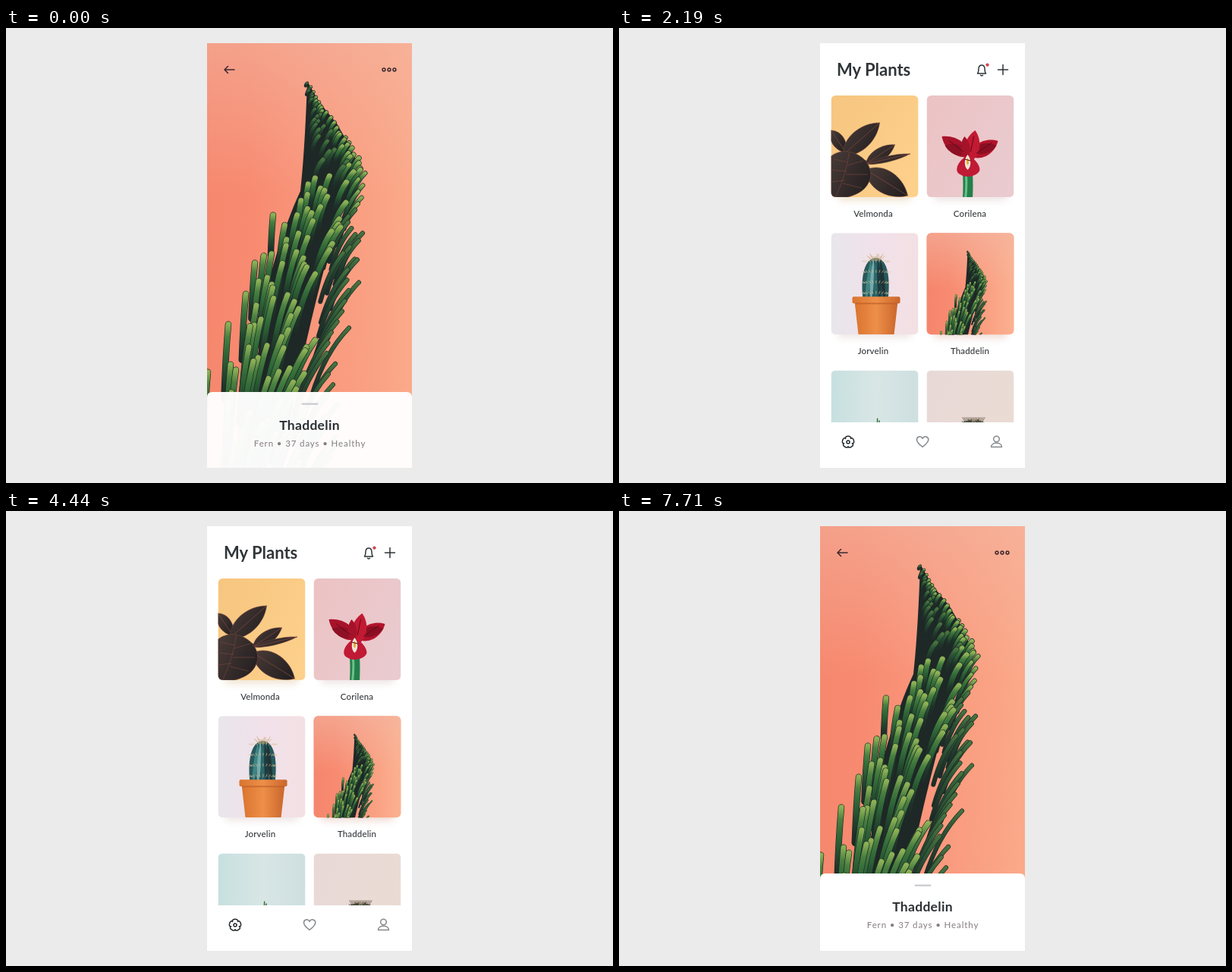
Write an HTML page that moves like this. It is 800x600 px and loops after 7740 ms.

```html
<!DOCTYPE html>
<html lang="en">
<head>
<meta charset="utf-8">
<title>My Plants</title>
<style>
  html, body { margin: 0; width: 100%; height: 100%; overflow: hidden; background: #ebebeb; }
  svg { display: block; width: 800px; height: 600px; font-family: Lato, "Open Sans", sans-serif; }
  .title { font-weight: 700; font-size: 22px; fill: #2f3538; }
  .label { font-size: 11.5px; font-weight: 500; letter-spacing: .15px; fill: #34383b; text-anchor: middle; }
  .name { font-size: 17.5px; font-weight: 700; letter-spacing: .3px; fill: #2b3033; text-anchor: middle; }
  .info { font-size: 11.5px; letter-spacing: .88px; fill: #857d80; text-anchor: middle; }
  .line { fill: none; stroke-width: 1.5; stroke-linecap: round; stroke-linejoin: round; }
</style>
</head>
<body>
<svg id="stage" viewBox="0 0 800 600"></svg>
<script>
const LOOP = 7740;
const stage = document.getElementById('stage');

// ---- helpers ----
let seed = 11;
const random = () => (seed = (seed * 16807) % 2147483647) / 2147483647;
const between = (a, b) => a + (b - a) * random();
const lerp = (a, b, u) => a + (b - a) * u;
const clamp = v => Math.max(0, Math.min(1, v));
const span = (t, start, length) => clamp((t - start) / length);
const inOut = p => p < .5 ? 2 * p * p : 1 - 2 * (1 - p) ** 2;
const out = (p, n) => 1 - (1 - p) ** n;
const fix = v => v.toFixed(1);
const repeat = (n, f) => Array.from({ length: n }, (_, i) => f(i)).join('');
const rect = (x, y, w, h, fill, more = '') =>
  `<rect x="${x}" y="${y}" width="${w}" height="${h}" fill="${fill}" ${more}/>`;
const stroke = (d, color, width, more = '') =>
  `<path d="${d}" fill="none" stroke="${color}" stroke-width="${width}" stroke-linecap="round" ${more}/>`;
const gradient = (id, direction, ...colors) =>
  `<linearGradient id="${id}" ${direction}>${colors.map((c, i) =>
    `<stop offset="${i / (colors.length - 1)}" stop-color="${c}"/>`).join('')}</linearGradient>`;
const across = 'x1="0" y1="0" x2="1" y2="0"';
const down = 'x1="0" y1="0" x2="0" y2="1"';
const diagonal = 'x1="0" y1=".2" x2="1" y2=".8"';

function leaf(x1, y1, x2, y2, w, fill, vein) {
  const dx = x2 - x1, dy = y2 - y1, len = Math.hypot(dx, dy);
  const nx = -dy / len * w, ny = dx / len * w;
  const at = (u, s) => `${fix(x1 + dx * u + nx * s)} ${fix(y1 + dy * u + ny * s)}`;
  return `<path d="M${x1} ${y1}C${at(.2, 1)} ${at(.7, 1)} ${x2} ${y2}C${at(.7, -1)} ${at(.2, -1)} ${x1} ${y1}Z" fill="${fill}"
    ${vein ? `stroke="${vein}" stroke-width=".5"` : ''}/>` +
    (vein ? stroke(`M${x1} ${y1}L${x2} ${y2}`, vein, .9) : '');
}

// ---- fern, drawn at full-screen size ----
const outline = [ // y, left edge, right edge
  [70, 396, 399], [95, 395, 414], [125, 393, 437], [150, 392, 455], [180, 390, 474],
  [200, 388, 479], [225, 378, 468], [245, 350, 465], [268, 346, 471], [310, 324, 462],
  [350, 314, 460], [390, 304, 450], [440, 294, 436], [500, 286, 436], [600, 284, 432]];
const leadTips = [
  [397, 71], [352, 243], [350, 294], [328, 306], [316, 347], [333, 330], [293, 387], [327, 388],
  [296, 440], [303, 447], [320, 417], [266, 450], [366, 418], [344, 415], [380, 357], [393, 308],
  [438, 255], [465, 333], [452, 393], [463, 303], [470, 268], [437, 495], [323, 503], [338, 518], [372, 525], [393, 452]];

function edgesAt(y) {
  const i = Math.max(1, outline.findIndex(row => row[0] >= y));
  const a = outline[i - 1], b = outline[i], u = clamp((y - a[0]) / (b[0] - a[0]));
  return [lerp(a[1], b[1], u), lerp(a[2], b[2], u)];
}

function needle(x, y) {
  const [left, right] = edgesAt(y);
  const u = clamp((x - left) / Math.max(1, right - left));
  const top = y < 185, edge = u > .8;
  const len = top ? 5 + (y - 70) * .22 : Math.min(95, 34 + (y - 185) * .3);
  const lean = top ? .6 : .08 + u * .66;
  const cx = x - Math.sin(lean) * len * .5, cy = y + Math.cos(lean) * len * .5;
  const bx = cx - Math.sin(lean * .5) * len * .5, by = cy + len * .6;
  const w = top ? 3.2 + (y - 70) * .03 : edge ? 5 : 7.4;
  const d = `M${fix(x)} ${fix(y + w / 2)}Q${fix(cx)} ${fix(cy)} ${fix(bx)} ${fix(by)}`;
  const dull = top ? u < .75 : edge && y > 230;
  return stroke(d, '#1d2a26', w + 1) + stroke(d, dull ? 'url(#shade)' : 'url(#needle)', w - .4);
}

function fern() {
  const tips = leadTips.slice();
  let side = 0;
  for (let y = 76; y < 600; y += y < 185 ? 2.2 : y < 300 ? 2.7 : 4.6) {
    const [left, right] = edgesAt(y);
    const inner = y < 185 ? between(.35, .95) : between(.04, .8);
    tips.push([lerp(left, right, side++ % 3 ? inner : between(.84, 1)), y]);
  }
  tips.sort((a, b) => a[1] - b[1]);
  return rect(230, 0, 360, 600, 'url(#coral)') + rect(230, 0, 360, 220, 'url(#haze)') +
    `<path d="M397 70C395 130 392 180 388 215C374 245 358 290 346 335C338 385 336 440 312 500L298 600H362
      C372 520 392 420 424 300C438 255 450 215 468 188L452 154L436 126L413 98Z" fill="#1e2826"/>` +
    tips.map(tip => needle(...tip)).join('');
}

// ---- card pictures, 115 by 134 ----
const dark = 'url(#wine)', vein = '#74433c';
const rubber = () => rect(0, 0, 115, 134, 'url(#amber)') +
  stroke('M18 74Q40 86 56 90M40 96L60 112', '#3b2a28', 2) +
  leaf(0, 46, 20, 76, 11, dark, vein) + leaf(16, 78, 64, 36, 17, dark, vein) +
  leaf(46, 90, 84, 65, 11, dark, vein) + leaf(48, 90, 104, 77, 5, dark, vein) +
  leaf(46, 98, 101, 132, 20, dark, vein) +
  `<path d="M24 74C42 78 54 92 52 108C48 124 36 130 22 134H0V80C8 74 16 73 24 74Z" fill="${dark}" stroke="${vein}" stroke-width=".6"/>` +
  stroke('M24 75Q20 104 6 134M22 88L4 84M20 100L0 98M17 112L0 114M22 92L42 86M20 104L48 104M16 116L40 122', vein, .7);

const iris = () => rect(0, 0, 115, 134, 'url(#rose)') +
  stroke('M54 102Q55 118 54 136', '#22804a', 13, 'stroke-linecap="butt"') +
  stroke('M52 106Q53 120 51 136', '#6cc088', 3) +
  leaf(56, 80, 20, 54, 13, '#a8132a') + leaf(54, 76, 24, 66, 9, '#8e1024') +
  leaf(58, 80, 94, 60, 13, '#b3142b') + leaf(60, 74, 92, 66, 9, '#8b0f22') +
  leaf(56, 88, 64, 46, 13, '#c21a33') + leaf(52, 84, 50, 54, 8, '#a5132a') +
  `<path d="M52 80C40 88 36 100 44 104C52 110 68 106 70 98C70 90 62 84 58 80Z" fill="#c01a35"/>` +
  leaf(54, 98, 54, 78, 5, '#f3e6d8') + leaf(54, 92, 54, 82, 2, '#e0ad2d') +
  stroke('M50 84L58 86M30 60L48 74M86 62L66 76M62 54L58 74', '#5f0918', 1);

const cactus = () => rect(0, 0, 115, 134, 'url(#lilac)') +
  `<path d="M42 88C39 62 42 34 59 33C76 34 78 62 75 88Z" fill="#28595c"/>` +
  repeat(5, i => leaf(46 + i * 6.2, 90, 53 + i * 3, 34, 3.4, ['#3f8584', '#75aaa9', '#2c676b', '#1e3b40', '#203334'][i])) +
  repeat(44, i => {
    const a = -.2 - (i % 11) * .27, y = 38 + Math.floor(i / 11) * 14, x = 59 + Math.cos(a) * 15;
    return stroke(`M${fix(x)} ${y}l${fix(Math.cos(a) * 4)} ${fix(Math.sin(a) * 3)}`, '#d9c39b', .7);
  }) +
  repeat(13, i => stroke(`M${53 + i} 36l${fix((i - 6) * .9)} ${fix(between(-9, -4))}`, '#c9a978', .7)) +
  `<path d="M31 90H88L83 134H36Z" fill="url(#clay)"/>` + rect(28, 84, 63, 9, 'url(#clay)', 'rx="2"') +
  rect(32, 92, 55, 2, '#b75a24', 'opacity=".6"');

const grass = () => rect(0, 0, 115, 134, 'url(#mint)') +
  `<path d="M30 114H88L84 134H34Z" fill="#f3f5f3"/>` +
  repeat(65, i => {
    const x = between(20, 101), base = lerp(59, x, .55), y = 63 + Math.abs(x - 60) * .55 + between(0, 22);
    return stroke(`M${fix(base)} 117Q${fix(base)} 92 ${fix(x)} ${fix(y)}`, ['#4f8a35', '#79ac45', '#2f6530', '#9dc464'][i % 4], 1.4);
  });

const barrel = () => rect(0, 0, 115, 134, 'url(#blush)') +
  `<path d="M36 110H88L84 134H40Z" fill="#f4ece9"/><ellipse cx="62" cy="91" rx="28" ry="26" fill="#4a5842"/>` +
  repeat(100, () => {
    const a = between(0, 6.28), r = Math.sqrt(random()), x = 62 + Math.cos(a) * 28 * r, y = 91 + Math.sin(a) * 26 * r;
    return stroke(`M${fix(x - 2)} ${fix(y - 2)}l4 3m0 -3l-4 3`, random() < .6 ? '#d8c8ae' : '#2c352b', .8);
  }) +
  repeat(15, i => stroke(`M${50 + i * 1.7} 67l${fix((i - 7) * .4)} -5`, '#6c5a4a', .8));

const miniFern = () => '<use href="#fern" transform="scale(.335) translate(-236 -1)"/>';

const plants = [
  ['Velmonda', rubber, '#d9b98a'], ['Corilena', iris, '#d5bcbf'], ['Jorvelin', cactus, '#d6c4c0'],
  ['Thaddelin', miniFern, '#d9a898'], ['Marisolda', grass, '#b3c6c4'], ['Perenelda', barrel, '#cbbab5']];

const card = ([name, picture, tone], i) => `<g id="card${i}">
  <rect x="8" y="18" width="99" height="121" rx="8" fill="${tone}" opacity=".38" filter="url(#soft)"/>
  <g clip-path="url(#frame)">${picture()}</g>
  <text class="label" x="${i % 2 ? 57 : 55.5}" y="159.5">${name}</text></g>`;

// ---- icons ----
const flower = () => `<path d="${repeat(5, i => {
  const p = (k, r) => { const a = (i + k) * Math.PI * .4 - Math.PI * .3; return `${fix(Math.cos(a) * r)} ${fix(Math.sin(a) * r)}`; };
  return `${i ? '' : 'M' + p(-1, 5.7)}C${p(-.95, 10.3)} ${p(-.05, 10.3)} ${p(0, 5.7)}`;
})}Z"/><circle r="2"/>`;

stage.innerHTML = `<defs>
  ${gradient('coral', across, '#f5866d', '#f78a70', '#f9977c', '#faa485', '#fbb392')}
  <linearGradient id="haze" ${down}><stop stop-color="#f3b9a6" stop-opacity=".55"/><stop offset="1" stop-color="#f3b9a6" stop-opacity="0"/></linearGradient>
  ${gradient('needle', down, '#8bb055', '#4a8040', '#336c39', '#295a33', '#23442d', '#1f322a', '#1e2b27')}
  ${gradient('shade', down, '#47733f', '#2d5636', '#25432f', '#20342b', '#1e2b27')}
  ${gradient('amber', diagonal, '#f7c680', '#fdd08b')} ${gradient('rose', diagonal, '#ecc3c4', '#e9cbd0')}
  ${gradient('lilac', across, '#e8e6eb', '#f1e1ea', '#f3e0e4')} ${gradient('mint', across, '#c6e0df', '#d8e6e5', '#cedfe0')}
  ${gradient('blush', diagonal, '#e8d9d7', '#eadcd3')} ${gradient('wine', diagonal, '#463936', '#231f20')}
  ${gradient('clay', across, '#d9742f', '#ee8f49', '#c9662b')}
  <filter id="soft" x="-30%" y="-30%" width="160%" height="160%"><feGaussianBlur stdDeviation="5"/></filter>
  <filter id="drop" x="-50%" y="-50%" width="200%" height="200%"><feDropShadow dx="1" dy="1.5" stdDeviation="1.3" flood-opacity=".4"/></filter>
  <clipPath id="frame"><rect width="115" height="134" rx="6"/></clipPath>
  <clipPath id="phone"><rect x="265" y="20" width="270" height="560"/></clipPath>
  <clipPath id="list"><rect x="265" y="74" width="270" height="506"/></clipPath>
  <clipPath id="wipe"><rect id="wipeBox" x="265" y="20" width="270" height="560"/></clipPath>
  <g id="fern">${fern()}</g>
</defs>
${rect(0, 0, 800, 600, '#ebebeb')}
${rect(265, 20, 270, 560, '#fff')}
<g clip-path="url(#phone)">
  <g id="home">
    <g clip-path="url(#list)">${plants.map(card).join('')}</g>
    <g id="header">
      <text class="title" x="287" y="62.5">My Plants</text>
      <g class="line" stroke="#2e3437">
        <path d="M472.5 60H483.5C481.8 58 482.3 56 482 53.5C481.6 47.5 474.4 47.5 474 53.5C473.7 56 474.2 58 472.5 60ZM476.5 62.3Q478 63.6 479.5 62.3M499.5 55H512.5M506 48.5V61.5"/>
      </g>
      <circle cx="485.5" cy="48.6" r="2.2" fill="#d24552"/>
    </g>
    <g id="nav">
      <rect id="navBack" x="265" width="270" height="62" fill="#fff"/>
      <g class="line" stroke="#23282b" transform="translate(302 26)">${flower()}</g>
      <g class="line" stroke="#85898c">
        <path d="M400 32.5C394 28 392.5 25.5 392.5 22.8C392.5 18.5 398 17.2 400 21.3C402 17.2 407.8 18.5 407.8 22.8C407.8 25.5 406 28 400 32.5Z"/>
        <circle cx="497.5" cy="22" r="3.8"/><path d="M490.5 32.5C490.5 25.5 504.5 25.5 504.5 32.5Z"/>
      </g>
    </g>
  </g>
  <g id="detail">
    <g clip-path="url(#wipe)"><use href="#fern"/></g>
    <g id="tools" class="line" stroke="#3b2930">
      <path d="M301 55H288M292.5 50.5L288 55L292.5 59.5"/>
      <circle cx="498" cy="55" r="1.9"/><circle cx="505" cy="55" r="1.9"/><circle cx="512" cy="55" r="1.9"/>
    </g>
    <g id="sheet">
      <path id="sheetBack" d="M265 110V7Q265 0 272 0H528Q535 0 535 7V110Z" fill="#fff"/>
      ${rect(389.5, 14.5, 22, 2.6, '#cfcfd3', 'rx="1.3"')}
      <text class="name" x="400" y="50">${plants[3][0]}</text>
      <text class="info" x="400.5" y="72">Fern • 37 days • Healthy</text>
    </g>
  </g>
  <g id="touch"><circle r="15" fill="#dadade" fill-opacity=".75" stroke="#fff" stroke-opacity=".7" filter="url(#drop)"/></g>
</g>`;

// ---- motion ----
const part = id => document.getElementById(id);
const cards = plants.map((_, i) => part('card' + i));
const ids = ['home', 'header', 'nav', 'navBack', 'detail', 'wipeBox', 'tools', 'sheet', 'sheetBack', 'touch'];
const el = Object.fromEntries(ids.map(id => [id, part(id)]));
const move = (node, x, y) => node.setAttribute('transform', `translate(${x} ${y.toFixed(2)})`);
const fade = (node, v) => node.setAttribute('opacity', v.toFixed(3));
const show = (node, on) => node.setAttribute('display', on ? 'inline' : 'none');

function drawHome(t) {
  const scroll = 120 * (inOut(span(t, 2750, 660)) - inOut(span(t, 3650, 660)));
  cards.forEach((node, i) => {
    const enter = span(t, 1019 - (5 - i) * 52, 800), leave = span(t, 6100 + (5 - i) * 35, 400);
    const slide = 500 * (1 - out(enter, 4) + leave ** 3);
    move(node, i % 2 ? 405.5 : 279.5, 89 + 181.3 * Math.floor(i / 2) - scroll + slide);
    fade(node, clamp(enter * 5) * (1 - leave ** 2));
  });
  fade(el.header, span(t, 680, 250) * (1 - span(t, 6200, 250)));
  const shift = 60 * (1 - out(span(t, 1353, 600), 3) + span(t, 6100, 350) ** 3);
  move(el.nav, 0, 520 + shift);
  fade(el.navBack, 1 - shift / 140);
  return scroll;
}

function drawDetail(t) {
  const closing = t < 3000;
  const top = closing ? 20 + 560 * inOut(span(t, 150, 560)) : 580 - 560 * out(span(t, 6472, 750), 3);
  el.wipeBox.setAttribute('y', top.toFixed(2));
  el.wipeBox.setAttribute('height', Math.max(0, 580 - top).toFixed(2));
  fade(el.tools, closing ? 1 - span(t, 20, 200) : span(t, 7000, 250));
  const hidden = closing ? span(t, -40, 300) ** 2 : 1 - out(span(t, 6980, 660), 3);
  move(el.sheet, 0, 478 + 102 * hidden);
  fade(el.sheetBack, closing ? .97 : 1);
}

function drawTouch(t, scroll) {
  const drag = span(t, 2600, 120) * (1 - span(t, 4300, 120));
  const tap = span(t, 5300, 180) * (1 - span(t, 6100, 150));
  const press = 1 - .15 * span(t, 5950, 130);
  show(el.touch, drag + tap > 0);
  fade(el.touch, drag + tap);
  const [x, y] = t < 4700 ? [458, 451 - scroll] : [491, 334];
  el.touch.setAttribute('transform', `translate(${x} ${y.toFixed(2)}) scale(${press.toFixed(3)})`);
}

function draw(t) {
  const homeVisible = t > 650 && t < 6750;
  const detailVisible = t < 720 || t > 6460;
  show(el.home, homeVisible);
  show(el.detail, detailVisible);
  const scroll = homeVisible ? drawHome(t) : 0;
  if (detailVisible) drawDetail(t);
  drawTouch(t, scroll);
}

const start = performance.now();
function tick() {
  draw((performance.now() - start) % LOOP);
  requestAnimationFrame(tick);
}
tick();
</script>
</body>
</html>
```
